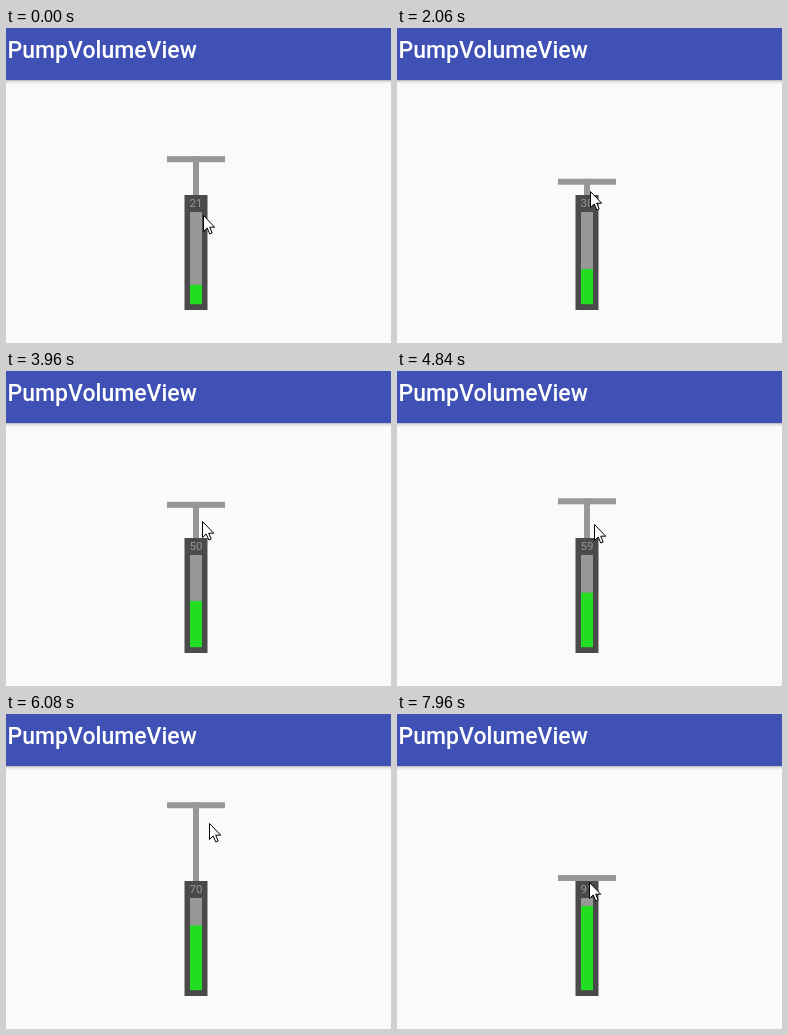
An HTML page with a canvas for the animation above (8 s loop, 385 by 315 pixels).

```html
<!DOCTYPE html>
<html lang="en">
<head>
<meta charset="utf-8">
<title>PumpVolumeView</title>
<style>
  html, body { margin: 0; width: 100%; height: 100%; overflow: hidden; background: #fafafa; }
  canvas { display: block; }
</style>
</head>
<body>
<canvas id="stage" width="385" height="315"></canvas>
<script>
const ctx = document.getElementById('stage').getContext('2d');
const LOOP = 8000;
const BOTTOM = 161;        // handle pushed all the way in
const PUSH_TIME = 435;     // duration of each push
const PX_PER_PERCENT = 10; // pushing the handle this far adds one percent
const FIRST_VOLUME = 17.1;
const POINTER_LEAD = 40;   // the handle trails the pointer

// Each push: when it starts and how far the handle is pulled out
const pushes = [
  [-243, 80], [960, 80], [1743, 100], [2900, 117], [3687, 61],
  [4592, 74], [5350, 80], [6065, 88], [6770, 108], [7460, 77]
];

const swing = u => (1 - Math.cos(Math.PI * u)) / 2;
const mix = (a, b, u) => a + (b - a) * u;

// Only pushing adds volume; pulling the handle back out leaves it unchanged.
function pumpAt(t) {
  const i = pushes.findLastIndex(([start]) => start <= t);
  const [start, top] = pushes[i];
  const next = pushes[i + 1];
  const pushEnd = start + PUSH_TIME;
  let y = mix(top, BOTTOM, swing(Math.min(1, (t - start) / PUSH_TIME)));
  const travel = pushes.slice(0, i).reduce((sum, push) => sum + BOTTOM - push[1], y - top);
  if (t > pushEnd && next) y = mix(BOTTOM, next[1], swing((t - pushEnd) / (next[0] - pushEnd)));
  return { y, volume: FIRST_VOLUME + travel / PX_PER_PERCENT };
}

// The distance between pointer and handle swells and fades over the loop.
function pointerAt(t, handleY) {
  const swell = Math.max(0, Math.cos(2 * Math.PI * (t - 450) / 5400));
  return {
    x: 204 - (handleY - 80) * 0.15,
    y: pumpAt(t + POINTER_LEAD).y + 7 + 47 * (1 - t / LOOP) * swell
  };
}

function rect(color, x, y, w, h) {
  ctx.fillStyle = color;
  ctx.fillRect(x, y, w, h);
}

function text(value, x, y, font, color, align) {
  ctx.font = font;
  ctx.fillStyle = color;
  ctx.textAlign = align;
  ctx.fillText(value, x, y);
}

function drawAppBar() {
  const shadow = ctx.createLinearGradient(0, 52, 0, 56);
  shadow.addColorStop(0, '#b4b4b8');
  shadow.addColorStop(0.4, '#e0e0e2');
  shadow.addColorStop(1, '#fafafa');
  rect(shadow, 0, 52, 385, 4);
  rect('#3f51b5', 0, 0, 385, 52);
  text('PumpVolumeView', 1.6, 29.5, '500 23px Roboto, sans-serif', '#fff', 'left');
}

function drawPump(top, volume) {
  const level = Math.floor(volume);
  const height = level * 0.925;
  rect('#979797', 187, top, 6, 167 - top);
  rect('#979797', 161, top, 58, 6);
  rect('#4a4a4a', 178.5, 167, 23, 115);
  rect('#979797', 184, 184, 12, 92);
  rect('#22dd22', 184, 276.2 - height, 12, height);
  text(level, 190, 178.5, '11.5px Roboto, sans-serif', '#979797', 'center');
}

const arrow = new Path2D('M.5 .5V16.5L4.2 13L6.8 19L9.2 18L6.7 12.2H11.7Z');

function drawPointer({ x, y }) {
  ctx.save();
  ctx.translate(Math.round(x), Math.round(y));
  ctx.fillStyle = '#fff';
  ctx.strokeStyle = '#000';
  ctx.fill(arrow);
  ctx.stroke(arrow);
  ctx.restore();
}

const start = performance.now();

function draw(now) {
  const t = Math.max(0, now - start) % LOOP;
  const { y, volume } = pumpAt(t);
  rect('#fafafa', 0, 0, 385, 315);
  drawAppBar();
  drawPump(y, volume);
  drawPointer(pointerAt(t, y));
  requestAnimationFrame(draw);
}

requestAnimationFrame(draw);
</script>
</body>
</html>
```
